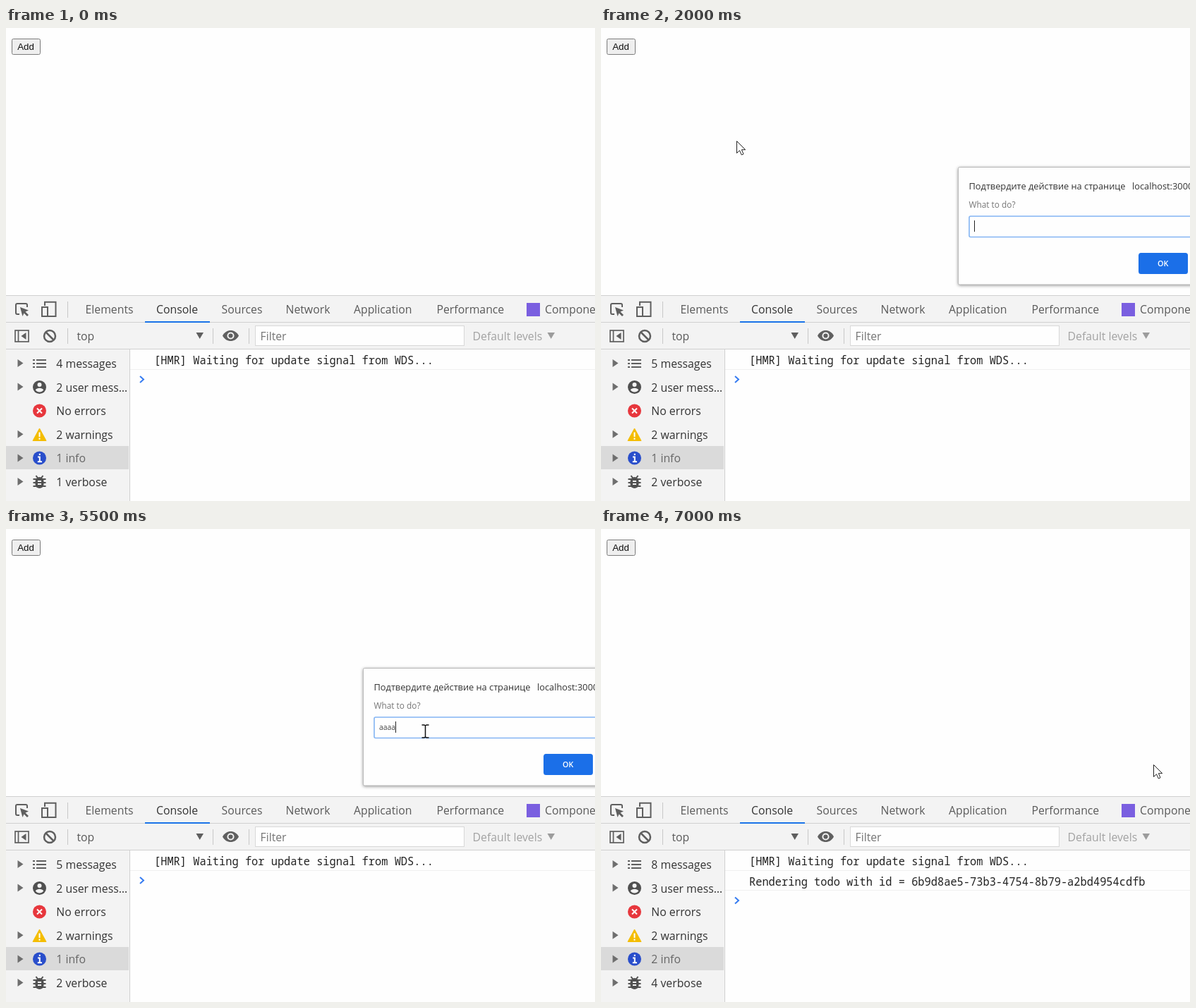
Animation of 835 by 671 pixels, one loop 8 s. Source, as an HTML page:

```html
<!DOCTYPE html>
<html lang="en">
<head>
<meta charset="utf-8">
<title>Prompt and console</title>
<style>
  html, body { margin: 0; width: 100%; height: 100%; overflow: hidden; background: #fefefe; }
  svg { display: block; }
  text { font: 15.8px "Open Sans", "Noto Sans", sans-serif; fill: #5a5a5a; white-space: pre; }
  .dark text { fill: #333; }
  .mono text { font: 15.35px "Noto Sans Mono", monospace; fill: #222; }
  .line { fill: none; stroke: #5f5f5f; stroke-width: 2; }
  .solid { fill: #5f5f5f; }
  .white { fill: none; stroke: #fff; stroke-width: 2; }
</style>
</head>
<body>
<svg width="835" height="671" viewBox="0 0 835 671">
  <rect width="835" height="671" fill="#fefefe"/>
  <rect id="add" x="8.5" y="15.5" width="40" height="22" rx="2"/>
  <text x="16.2" y="31.3" style="font:13.33px 'Liberation Sans',sans-serif;fill:#111">Add</text>

  <!-- developer tools -->
  <rect y="379" width="835" height="77" fill="#f3f3f3"/>
  <rect y="456" width="175" height="215" fill="#f3f3f3"/>
  <path d="M0 379.5H835M0 417.5H835M0 455.5H835M175.5 456V671" stroke="#d0d0d0"/>
  <path d="M87.5 388V411M87.5 426V448M293.5 426V448M344.5 426V448" stroke="#c8c8c8"/>
  <rect x="197" y="416" width="92" height="2" fill="#1a73e8"/>
  <g id="tabs"></g>
  <rect x="738" y="390" width="19" height="19" fill="#7a5fe0"/>

  <path class="line" stroke-width="1.6" d="M19 406H16Q14 406 14 404V393Q14 391 16 391H28Q30 391 30 393V396"/>
  <path class="solid" d="M20 396L32 400.5 27.5 402.5 32 407 30 409 25.500 404.500 23.500 409Z"/>
  <path class="line" d="M55 394V388.700H70.500V409H60"/>
  <rect class="line" x="51" y="396" width="8" height="13"/>
  <rect class="line" x="13" y="429" width="19" height="16" style="stroke-width:1.7"/>
  <path class="line" d="M17.500 429V445" style="stroke-width:1.700"/>
  <path class="solid" d="M28.500 432V442L21.500 437Z"/>
  <path class="line" d="M56 431L68 443" style="stroke-width:2.5"/>
  <circle class="line" cx="62" cy="437" r="8" style="stroke-width:2.5"/>
  <path class="solid" d="M269.500 432H280L274.700 441Z"/>
  <path class="solid" d="M307 436.500C312 426.500 325 426.500 330 436.500C325 446.500 312 446.500 307 436.500Z"/>
  <circle cx="318.500" cy="436.500" r="4.100" class="solid" stroke="#f3f3f3" stroke-width="2"/>
  <rect x="353.500" y="422.500" width="296" height="28" fill="#fefefe" stroke="#d8d8d8"/>
  <path d="M767.500 432H778L772.700 441Z" fill="#9c9c9c"/>
  <text x="100.500" y="442.700">top</text>
  <text x="360.500" y="443.300" style="fill:#757575">Filter</text>
  <text x="661.500" y="442.700" style="fill:#a2a2a2">Default levels</text>

  <!-- sidebar -->
  <rect y="593" width="174" height="33" fill="#dadada"/>
  <g id="rows" class="dark"></g>
  <path d="M38 471H41M38 476H41M38 481H41M43 471H57M43 476H57M43 481H57" class="line"/>
  <g transform="translate(47.500 509.500)">
    <circle r="9.500" fill="#505050"/>
    <circle cy="-3.500" r="3" fill="#f3f3f3"/>
    <path d="M-5.700 4C-4 .3 4 .3 5.700 4C3 8 -3 8 -5.700 4Z" fill="#f3f3f3"/>
  </g>
  <circle cx="47.500" cy="543" r="9.500" fill="#e7373d"/>
  <path class="white" d="M44 539.500L51 546.500M51 539.500L44 546.500"/>
  <path d="M47.500 568L57 585.500H38Z" fill="#f4bd00" stroke="#f4bd00" stroke-linejoin="round"/>
  <path class="white" d="M47.500 573.500V580M47.500 581.500V583.700"/>
  <circle cx="47.500" cy="610" r="9.500" fill="#294ecb"/>
  <path class="white" d="M47.800 603.700V606M45 608.500H47.800V615M44.800 615.200H51"/>
  <g transform="translate(47.500 644)">
    <path class="line" d="M-9 -4H9M-9 1H9M-9 6H9M-5 -9L-2 -5M5 -9L2 -5" style="stroke:#505050"/>
    <rect x="-6" y="-7" width="12" height="16" rx="6" fill="#505050"/>
    <path d="M-2.500 -1H2.500M-2.500 3H2.500" stroke="#f3f3f3" stroke-width="1.800"/>
  </g>

  <!-- console -->
  <g class="mono">
    <text x="210" y="477">[HMR] Waiting for update signal from WDS...</text>
    <path d="M176 484.500H835" stroke="#f0f0f0"/>
    <g id="log">
      <text x="210" y="505.500">Rendering todo with id = 6b9d8ae5-73b3-4754-8b79-a2bd4954cdfb</text>
      <path d="M176 512.500H835" stroke="#f0f0f0"/>
    </g>
  </g>
  <path id="chevron" d="M190 494L195 498.500 190 503" fill="none" stroke="#367cf1" stroke-width="2"/>

  <!-- dialog -->
  <g id="dialog">
    <rect x="506.500" y="197.500" width="450" height="166.500" rx="2" fill="#fefefe" stroke="#b9b9b9"
      style="filter:drop-shadow(0 1px 2px #0006)"/>
    <text y="228.700" style="font-size:12.800px;fill:#333"><tspan x="521.500">Подтвердите действие на странице</tspan><tspan x="753">localhost:3000</tspan></text>
    <text x="521.500" y="255" style="font-size:11.850px;fill:#757575">What to do?</text>
    <rect id="field" x="522" y="267" width="420" height="29.500" rx="2" fill="#fefefe"/>
    <text id="typed" x="529" y="285.300" style="font-size:10.400px;fill:#444"></text>
    <rect id="caret" y="273" width="1" height="16" fill="#222"/>
    <rect x="762" y="319" width="70" height="30" rx="3.500" fill="#1b6fe8"/>
    <text x="789" y="337.800" style="font-size:10.800px;font-weight:600;fill:#fff">OK</text>
  </g>

  <path id="arrow" d="M.5 .5V17.500L4.500 13.800 7.300 20 10 18.800 7.400 12.700H12.700Z" fill="#fff" stroke="#222"/>
  <path id="beam" d="M-5 -9H-1.500L0 -8 1.500 -9H5M0 -8V8M-5 9H-1.500L0 8 1.500 9H5" fill="none" stroke="#111" stroke-width="1.500"/>
</svg>
<script>
const STEP = 500, LOOP = 8000;
const $ = id => document.getElementById(id);
const show = (id, on) => $(id).setAttribute('visibility', on ? 'visible' : 'hidden');
const move = (id, x, y) => $(id).setAttribute('transform', `translate(${x} ${y})`);

const tabs = [['Elements', 112.5], ['Console', 213], ['Sources', 305.5], ['Network', 396.5],
  ['Application', 493], ['Performance', 610.5], ['Components', 764]];
$('tabs').innerHTML = tabs.map(([name, x]) =>
  `<text x="${x}" y="405.3"${name === 'Console' ? ' style="fill:#333"' : ''}>${name}</text>`).join('');

const rowNames = ['messages', 'user mess…', 'errors', 'warnings', 'info', 'verbose'];
$('rows').innerHTML = rowNames.map((name, i) => {
  const y = 476 + i * 33.6;
  const marker = i === 2 ? '' : `<path d="M16.500 ${y - 6}V${y + 5}L24.500 ${y - .5}Z" fill="#6e6e6e"/>`;
  return `${marker}<text x="71.3" y="${y + 6}"${i === 4 ? ' style="fill:#666"' : ''}></text>`;
}).join('');
const rowTexts = $('rows').querySelectorAll('text');

// Pointer position for each half second; the text beam is used over the field.
const pointer = [null, [244, 323], [52, 71], [31, 30], [192, 160], [573.5, 284], [571.5, 285],
  [571.5, 281], [571.5, 281], [571.5, 281], [571.5, 281], [594.5, 287], [768, 350], [783, 334]];
const typedLength = step => step < 10 ? 0 : [1, 4][step - 10] ?? 6;

function counts(step) {
  if (step >= 14) return [8, 3, 'No', 2, 2, 4];
  const calls = (step >= 4) + (step >= 13);
  return [4 + calls, 2, 'No', 2, 1, 1 + calls];
}

function draw(time) {
  const step = Math.floor(time % LOOP / STEP);
  const closing = step === 13, done = step >= 14, hover = step === 3;
  const length = typedLength(step);

  counts(step).forEach((n, i) => rowTexts[i].textContent = `${n} ${rowNames[i]}`);
  $('add').setAttribute('fill', hover ? '#e3e3e3' : '#efefef');
  $('add').setAttribute('stroke', hover ? '#555' : '#7b7b7b');

  show('dialog', step >= 4 && !done);
  move('dialog', 0, closing ? -2.3 : 0);
  $('field').setAttribute('stroke', closing ? '#e6e6e6' : '#83b4f3');
  $('field').setAttribute('stroke-width', closing ? 1 : 1.6);
  $('typed').textContent = 'a'.repeat(length);
  $('caret').setAttribute('x', 529 + Math.round(length * 5.8));
  show('caret', step >= 4 && step <= 12 && (length || step % 2 === 0));

  show('log', done);
  move('chevron', 0, done ? 28.5 : 0);

  const spot = pointer[Math.min(step, 13)];
  const overField = step >= 5 && step <= 11;
  show('arrow', spot && !overField);
  show('beam', overField);
  if (spot) move(overField ? 'beam' : 'arrow', ...spot);
}

const start = performance.now();
function tick() {
  draw(performance.now() - start);
  requestAnimationFrame(tick);
}
tick();
</script>
</body>
</html>
```
